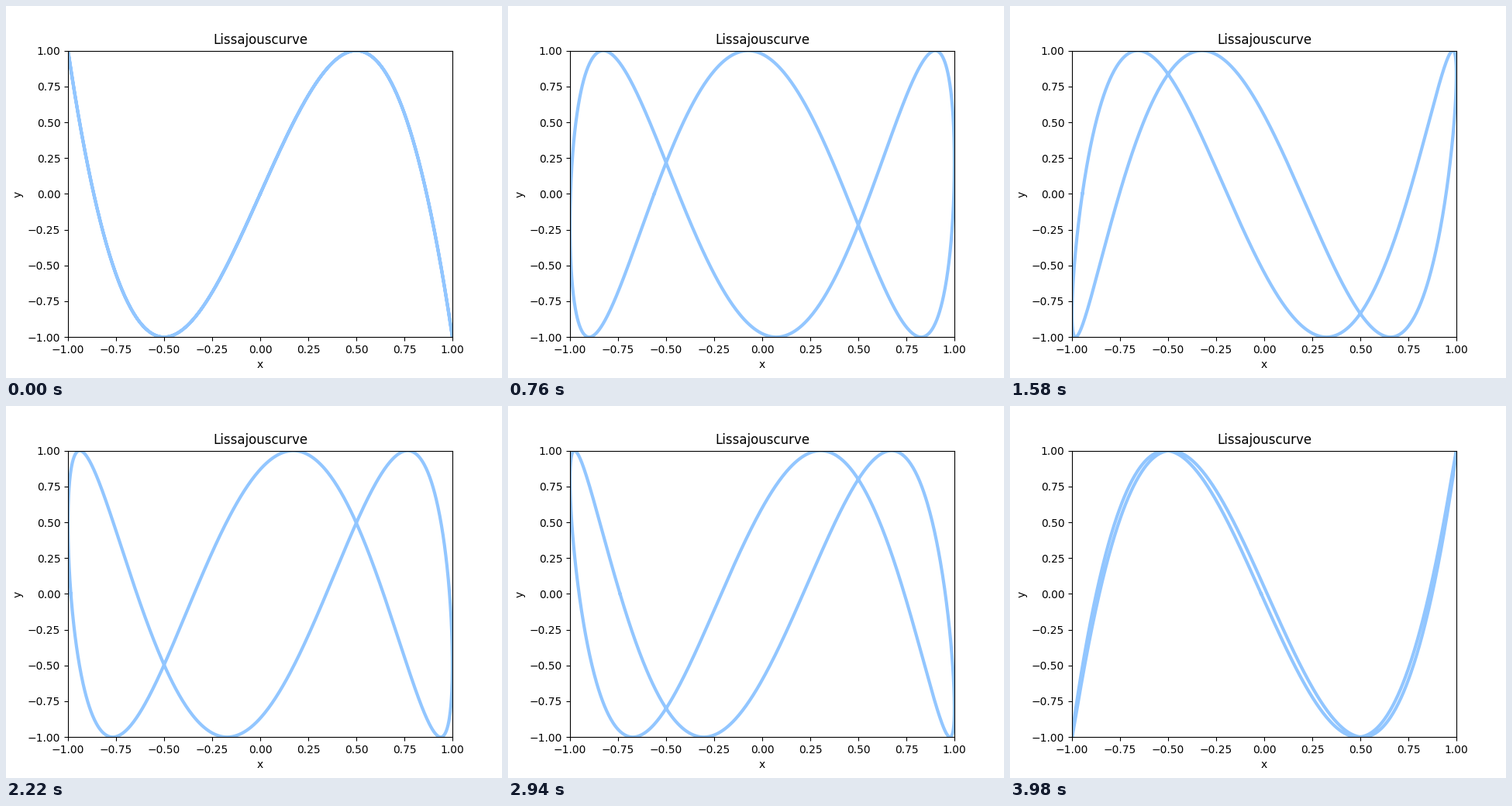
Animation, 640 px wide and 480 px high, one loop 4000 ms. Source, as a matplotlib script:

```python
import numpy as np
import matplotlib.pyplot as plt
from matplotlib.animation import FuncAnimation

FRAMES = 200
INTERVAL = 20  # ms

fig = plt.figure(figsize=(6.4, 4.8), dpi=100)
ax = plt.axes(xlim=(-1, 1), ylim=(-1, 1))
ax.set_title("Lissajouscurve")
ax.set_xlabel("x")
ax.set_ylabel("y")
line, = ax.plot([], [], lw=3, color="#92C6FF")

t = np.linspace(0, 4, 1000)
y = np.sin(1.5 * np.pi * t)


def init():
    line.set_data([], [])
    return line,


def animate(i):
    # The x oscillation drifts by half a period over one loop.
    x = np.sin(0.5 * np.pi * (t - 2 * i / FRAMES))
    line.set_data(x, y)
    return line,


anim = FuncAnimation(fig, animate, init_func=init, frames=FRAMES,
                     interval=INTERVAL, repeat=True, repeat_delay=0, blit=False)

plt.show()
```
